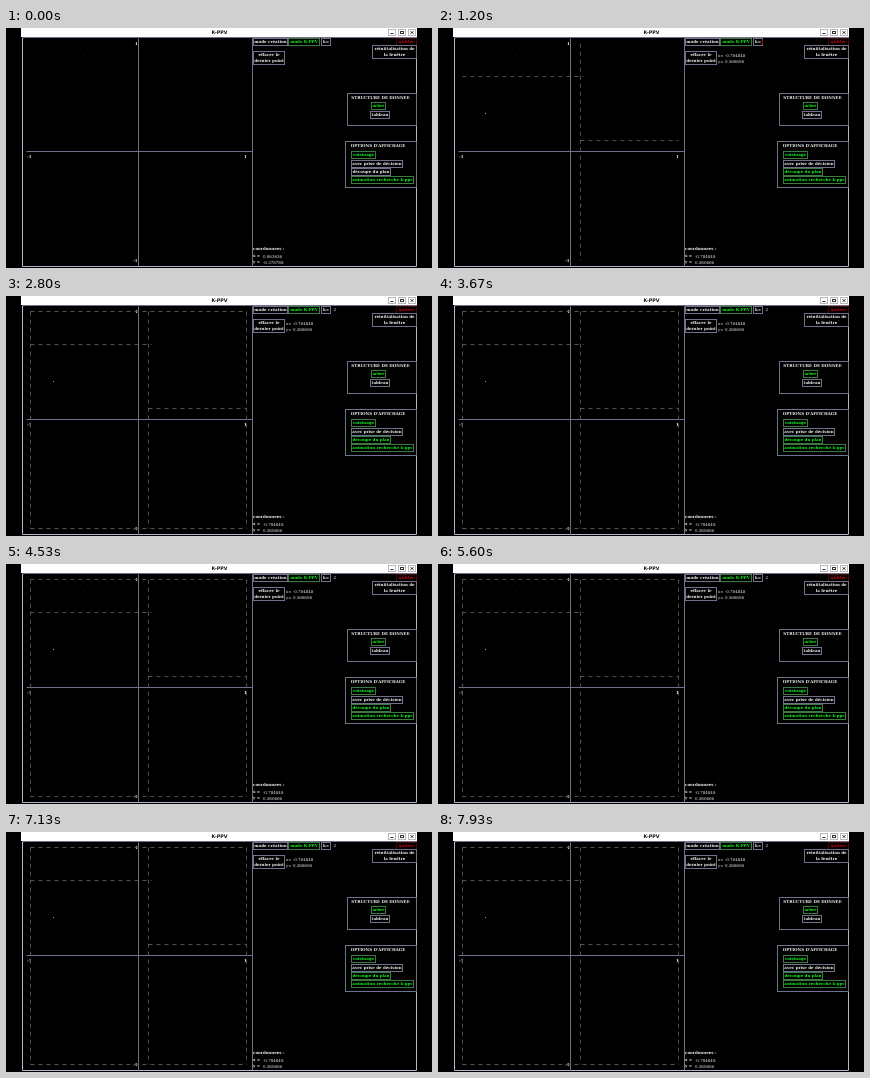
An HTML page with a canvas that plays this animation: 426x240 px, repeating every 8000 ms.

```html
<!DOCTYPE html>
<html lang="fr">
<head>
<meta charset="utf-8">
<title>K-PPV</title>
<style>
  html, body { margin: 0; width: 100%; height: 100%; overflow: hidden; background: #000; }
  canvas { display: block; width: 426px; height: 240px; }
</style>
</head>
<body>
<canvas></canvas>
<script>
const WIDTH = 426, HEIGHT = 240, LOOP = 8000;
const SPLIT_AT = 670, FRAME_AT = 1930;   // partition shown, then its outer frame
const WHITE = '#f0f0f0', GREEN = '#14f024', RED = '#b80808';
const LINE = '#71718c', EDGE = '#b4b4cc', DASH = '#4e564c';
const SERIF = '"DejaVu Serif", serif';

const canvas = document.querySelector('canvas');
const ratio = window.devicePixelRatio || 1;
canvas.width = WIDTH * ratio;
canvas.height = HEIGHT * ratio;
const ctx = canvas.getContext('2d');
ctx.scale(ratio, ratio);

function text(label, x, y, { color = WHITE, size = 4, weight = 'bold', align = 'left', family = SERIF } = {}) {
  ctx.font = `${weight} ${size}px ${family}`;
  ctx.textAlign = align;
  ctx.fillStyle = color;
  ctx.fillText(label, x, y);
}

function line(x1, y1, x2, y2, color = LINE, dash = []) {
  ctx.strokeStyle = color;
  ctx.setLineDash(dash);
  ctx.beginPath();
  ctx.moveTo(x1 + .5, y1 + .5);
  ctx.lineTo(x2 + .5, y2 + .5);
  ctx.stroke();
  ctx.setLineDash([]);
}

const dashed = (x1, y1, x2, y2) => line(x1, y1, x2, y2, DASH, [4, 4]);

function box(x, y, w, h, color = LINE) {
  ctx.strokeStyle = color;
  ctx.strokeRect(x + .5, y + .5, w, h);
}

function dot(x, y, color) {
  ctx.fillStyle = color;
  ctx.fillRect(x, y, 1, 1);
}

function button(labels, x, y, w, h, color = WHITE) {
  box(x, y, w, h, color === WHITE ? LINE : color === GREEN ? '#3c7a44' : '#480606');
  labels.forEach((label, i) =>
    text(label, x + w / 2 + .5, y + 5 + 6.2 * i, { color, align: 'center' }));
}

function drawWindow() {
  ctx.fillStyle = '#000';
  ctx.fillRect(0, 0, WIDTH, HEIGHT);
  ctx.fillStyle = '#fff';
  ctx.fillRect(15, 0, 396, 9);
  text('K-PPV', 213.5, 6.3, { color: '#111', size: 4.8, align: 'center', family: '"DejaVu Sans", sans-serif' });
  for (const x of [382, 392, 402]) box(x, 1, 7, 6, '#b8b8b8');
  line(384, 5, 387, 5, '#333');
  box(394, 3, 3, 2, '#333');
  line(404, 3, 407, 5, '#333');
  line(404, 5, 407, 3, '#333');
  line(16, 9, 16, 238, EDGE);
  line(410, 9, 410, 238, EDGE);
  line(16, 238, 410, 238, EDGE);
  line(16, 9, 410, 9);
}

function drawPlot(split, framed) {
  line(246, 10, 246, 238);
  line(132, 10, 132, 238);
  line(20, 123, 246, 123);
  text('1', 129, 16.5);
  text('-1', 127, 234);
  text('-1', 21, 129.5);
  text('1', 238, 129.5);
  for (const [x, y] of [[35, 48], [78, 27], [100, 69], [143, 177], [207, 82]]) dot(x, y, '#500808');
  if (split) {
    dashed(142, 15, 142, 232);
    dashed(24, 48, 145, 48);
    dashed(142, 112, 240, 112);
    dot(47, 85, '#a8a890');
  }
  if (framed) {
    dashed(24, 15, 240, 15);
    dashed(24, 232, 240, 232);
    dashed(24, 15, 24, 232);
    dashed(240, 15, 240, 232);
  }
}

function drawPanel(split, framed) {
  const plain = { weight: 'normal' };
  const [x, y] = split ? ['-0.784848', '0.360606'] : ['0.063636', '-0.378788'];

  button(['mode création'], 247, 10, 34, 7);
  button(['mode K-PPV'], 282, 10, 31, 7, GREEN);
  button(['k='], 315, 10, 9, 7);
  if (framed) text('2', 327.5, 15, plain);
  else if (split) line(324, 11, 324, 16, RED);
  button(['quitter'], 390, 10, 20, 7, RED);
  button(['réinitialisation de', 'la fenêtre'], 366, 17, 44, 13);
  button(['effacer le', 'dernier point'], 247, 23, 31, 13);
  if (split) {
    text(`x= ${x}`, 280, 28.5, plain);
    text(`y= ${y}`, 280, 34.5, plain);
  }

  box(341, 65, 69, 32);
  text('STRUCTURE DE DONNEE', 374.5, 70.5, { align: 'center' });
  button(['arbre'], 365, 74, 14, 7, GREEN);
  button(['tableau'], 364, 83, 19, 7);

  box(339, 113, 71, 46);
  text("OPTIONS D'AFFICHAGE", 372, 119.3, { align: 'center' });
  button(['voisinage'], 345, 123, 24, 7, GREEN);
  button(['avec prise de décision'], 345, 132, 51, 7);
  button(['découpe du plan'], 345, 140, 39, 7, split ? GREEN : WHITE);
  button(['animation recherche k-ppv'], 345, 148, 62, 7, GREEN);

  text('coordonnees :', 247, 222);
  text('x =', 247, 229);
  text(x, 257, 229.8, plain);
  text('y =', 247, 235.3);
  text(y, 257, 236, plain);
}

function render(now) {
  const time = now % LOOP;
  const split = time >= SPLIT_AT, framed = time >= FRAME_AT;
  ctx.lineWidth = 1;
  drawWindow();
  drawPlot(split, framed);
  drawPanel(split, framed);
  requestAnimationFrame(render);
}
render(0);
</script>
</body>
</html>
```
